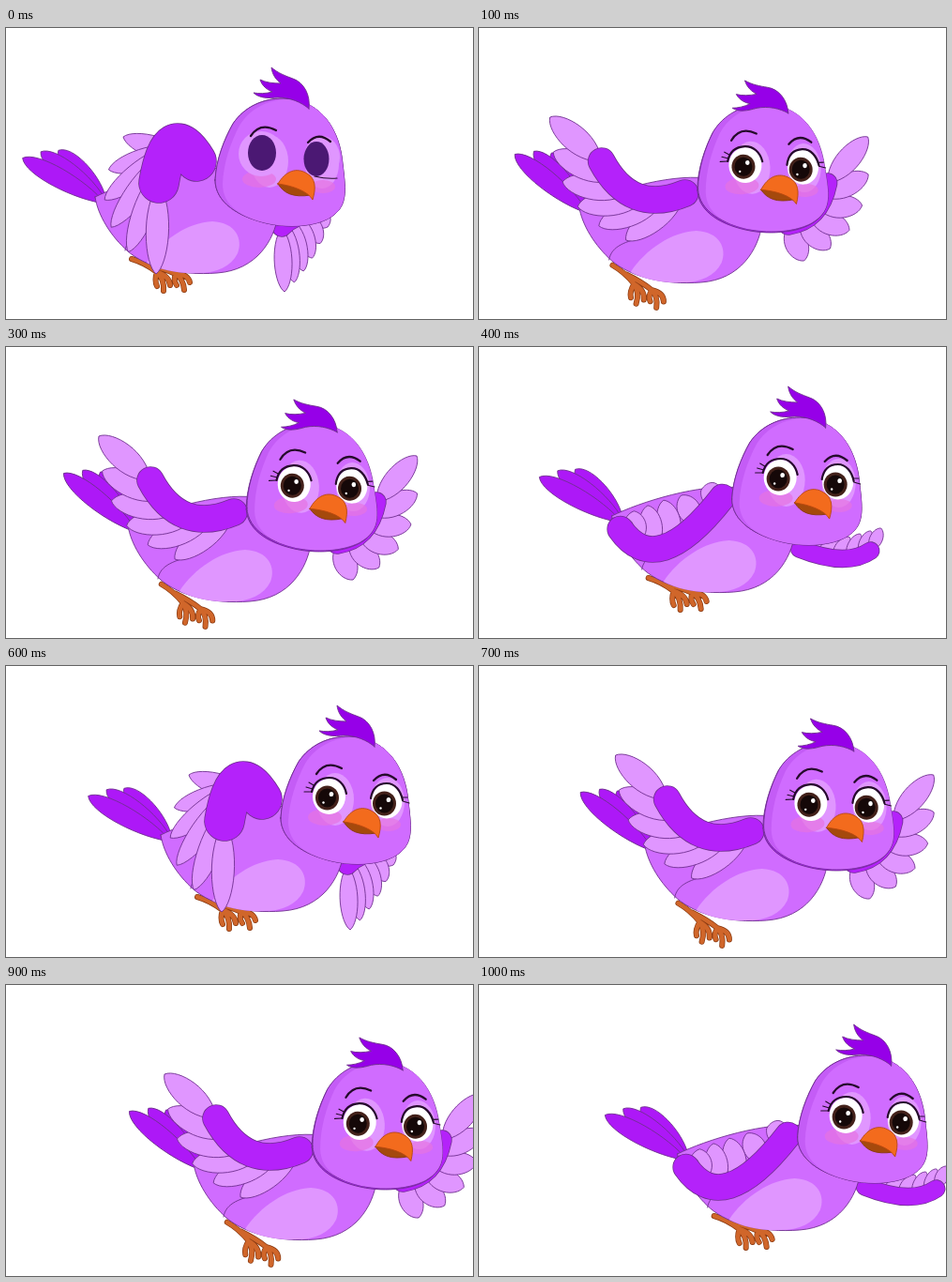
Write an HTML page with a canvas that moves like this. It is 498 by 310 pixels and loops after 1.05 s.

```html
<!DOCTYPE html>
<html lang="en">
<head>
<meta charset="utf-8">
<title>Flying bird</title>
<style>
  html, body { margin: 0; width: 100%; height: 100%; overflow: hidden; background: #fff; }
  canvas { display: block; width: 498px; height: 310px; }
</style>
</head>
<body>
<canvas id="stage" width="498" height="310"></canvas>
<script>
const ctx = document.getElementById('stage').getContext('2d');
const LOOP = 1050, STEP = 50, FLAP = 600, SPEED = 70 / FLAP, PLUMES = 6;
const C = {
  body: '#d06cff', shade: '#c45cf6', light: '#e096ff', wing: '#b422fa',
  tail: '#ad18f7', crest: '#9600e8', neck: '#a822ee', line: '#702f90',
  beak: '#f36b1d', mouth: '#a5490c', foot: '#d0662a', footLine: '#8a3a12', ink: '#260b2c'
};

// arm and tips: start, control and end of a curve, from outermost to innermost feather
const wing = (arm, tips, band, plume) => ({ arm, tips, band: [band], plume: [plume] });

const down = {
  near: wing([163,165, 175,95, 203,142], [160,262, 72,207, 125,116], 42, 32),
  far: wing([294,212, 305,200, 330,195], [297,281, 324,258, 343,212], 20, 25)
};
const up = {
  near: wing([136,84, 150,140, 205,168], [67,24, 80,150, 146,204], 40, 40),
  far: wing([376,122, 374,150, 335,185], [453,92, 410,214, 327,240], 28, 34)
};
const mid = {
  near: wing([119,142, 150,200, 208,176], [64,95, 65,195, 145,226], 28, 36),
  far: wing([360,165, 352,205, 318,210], [403,116, 413,224, 335,248], 20, 32)
};
const swept = {
  near: wing([104,194, 143,250, 213,160], [106,181, 135,165, 190,153], 27, 32),
  far: wing([371,217, 345,235, 295,215], [382,193, 355,200, 325,210], 18, 18)
};
const timeline = [[0, down], [100, mid], [200, up], [300, mid], [400, swept], [FLAP, down]];

const shape = {
  body: 'M95 180C125 165 190 145 230 150L290 200C286 225 268 258 225 261C185 264 150 255 130 238C112 222 98 200 95 180Z',
  belly: 'M150 250C166 226 194 207 220 206C245 207 253 225 247 240C240 254 225 261 205 261C185 262 165 258 150 250Z',
  thigh: 'M164 213C146 217 129 222 127 237',
  head: 'M223 162C224 140 233 118 242 102C254 84 274 75 296 75C338 77 356 110 359 145C362 170 364 186 352 197C338 211 305 214 278 208C248 201 223 186 223 162Z',
  face: 'M231 166C232 143 240 121 249 104C260 86 278 77 299 76C338 77 356 110 359 145C362 170 364 186 352 197C338 211 305 214 278 208C252 202 231 190 231 166Z',
  crest: 'M323 86C325 72 318 58 306 54C298 51 290 48 283 42C284 50 288 55 293 59C285 59 277 58 271 55C273 62 279 66 284 68C277 70 270 70 264 69C270 75 280 75 290 74C303 74 315 79 323 86Z',
  beak: 'M290 166C298 152 310 148 321 155C330 160 331 170 327 183C322 174 306 168 290 166Z',
  mouth: 'M290 166C296 176 306 181 325 178C318 171 305 167 290 166Z',
  brows: 'M261 115Q271 100 288 109M322 122Q333 110 346 121',
  lids: 'M256 134C259 122 267 119 275 119C284 119 291 126 293 136M319 141C321 129 328 125 336 125C345 125 351 133 353 143',
  lashes: 'M257 131L250 129M256 134L248 134M258 127L253 124M352 140L358 140M353 144L360 146',
  legs: 'M134 246Q148 250 161 260Q158 269 161 275M161 260Q169 268 168 280M161 260Q174 264 175 274M150 252Q168 256 181 262Q178 269 182 274M181 262Q189 267 190 279M181 262Q194 262 196 271',
  squint: 'M329 158Q342 161 353 160'
};
for (const k in shape) shape[k] = new Path2D(shape[k]);

const mix = (a, b, k) => a.map((v, i) => v + (b[i] - v) * k);

function wingAt(side, phase) {
  const i = timeline.findIndex(([end]) => end > phase);
  const [t0, a] = timeline[i - 1], [t1, b] = timeline[i];
  const pose = {};
  for (const key in a[side]) pose[key] = mix(a[side][key], b[side][key], (phase - t0) / (t1 - t0));
  return pose;
}

function onCurve([ax, ay, bx, by, cx, cy], u) {
  const v = 1 - u;
  return [v * v * ax + 2 * u * v * bx + u * u * cx, v * v * ay + 2 * u * v * by + u * u * cy];
}

function paint(path, fill, stroke = C.line, width = 0.9) {
  if (fill) { ctx.fillStyle = fill; ctx.fill(path); }
  if (stroke) { ctx.strokeStyle = stroke; ctx.lineWidth = width; ctx.stroke(path); }
}

function oval(x, y, rx, ry, fill) {
  const p = new Path2D();
  p.ellipse(x, y, rx, ry, 0, 0, Math.PI * 2);
  paint(p, fill, null);
}

function group(draw, x, y, turn = 0, px = 0, py = 0, size = 1) {
  ctx.save();
  ctx.translate(x + px, y + py);
  ctx.rotate(turn * Math.PI / 180);
  ctx.scale(size, size);
  ctx.translate(-px, -py);
  draw();
  ctx.restore();
}

// blunt: fullness near the tip
function feather([x, y], [tx, ty], w, fill, blunt) {
  const dx = tx - x, dy = ty - y, len = Math.hypot(dx, dy) || 1;
  const nx = -dy / len * w, ny = dx / len * w;
  const at = (d, n) => [x + dx * d + nx * n, y + dy * d + ny * n];
  const p = new Path2D();
  p.moveTo(x, y);
  p.bezierCurveTo(...at(0.3, 0.6), ...at(0.9, blunt), tx, ty);
  p.bezierCurveTo(...at(0.9, -blunt), ...at(0.3, -0.6), x, y);
  paint(p, fill);
}

function drawWing({ arm, tips, band, plume }) {
  for (let i = PLUMES - 1; i >= 0; i--) {
    const u = i / (PLUMES - 1);
    feather(onCurve(arm, u), onCurve(tips, u), plume[0], C.light, 0.4);
  }
  const p = new Path2D();
  p.moveTo(arm[0], arm[1]);
  p.quadraticCurveTo(...arm.slice(2));
  paint(p, null, C.line, band[0] + 1.6);
  paint(p, null, C.wing, band[0]);
}

function tail() {
  for (let i = 2; i >= 0; i--) {
    const a = (207 + 10 * i) * Math.PI / 180, r = 98 - 13 * i;
    feather([106, 187 - 4 * i], [105 + r * Math.cos(a), 183 + r * Math.sin(a)], 21, C.tail, 0.7);
  }
}

function legs() {
  paint(shape.legs, null, C.footLine, 6);
  paint(shape.legs, null, C.foot, 4.6);
}

function eye(x, y, rx, ry, px, py) {
  oval(x, y, rx, ry, '#fff');
  oval(px, py, 12.5, 13, '#43211a');
  oval(px, py, 9.5, 10, '#150808');
  oval(px + 4.5, py - 4, 2.3, 2.6, '#fff');
  oval(px - 4, py + 5, 1.2, 1.2, '#fff');
}

function openEyes() {
  eye(274.5, 139, 17.5, 19, 272.5, 140.5);
  eye(336, 144, 16.5, 18.5, 333.5, 146.5);
  paint(shape.lids, null, C.ink, 2.2);
  paint(shape.lashes, null, C.ink, 1.1);
}

function dimEyes() {
  oval(272, 134, 24, 24, C.light);
  oval(337, 138, 19, 23, C.light);
  oval(273, 133, 15, 19, '#4b1873');
  oval(331, 139.5, 13.5, 18.5, '#4b1873');
  paint(shape.squint, null, C.ink, 1.2);
}

function head(lift, dim) {
  group(() => paint(shape.head, C.neck), -1.5 * lift, 2.6 * lift);
  paint(shape.head, C.shade);
  paint(shape.face, C.body, null);
  group(() => paint(shape.crest, C.crest), 0, 0, -16 * lift, 323, 86, 1 - 0.05 * lift);
  oval(281, 142, 20, 28, C.light);
  oval(337, 145, 18, 26, C.light);
  oval(270, 161, 18, 9, 'rgba(230,115,225,.7)');
  oval(338, 169, 13, 7, 'rgba(230,115,225,.7)');
  (dim ? dimEyes : openEyes)();
  group(() => paint(shape.brows, null, C.ink, 2.3), 0, -6 * lift);
  paint(shape.mouth, C.mouth, C.footLine);
  paint(shape.beak, C.beak, '#b8480f');
}

function bird(t) {
  const phase = t % FLAP;
  const lift = Math.max(0, 1 - Math.abs(phase - 200) / 200);

  drawWing(wingAt('far', phase));
  group(tail, 0, 20 * lift, 20 * lift, 102, 182);
  group(legs, -6 * lift, 14 * lift, 27 * lift, 135, 245);
  group(() => {
    paint(shape.body, C.body);
    paint(shape.belly, C.light, null);
    paint(shape.thigh, null);
  }, 0, 20 * lift);
  drawWing(wingAt('near', phase));
  group(() => head(lift, t < STEP), -4 * lift, 12.5 * lift, -5.5 * lift, 292, 145);
}

const start = performance.now();
function frame(now) {
  const t = Math.floor(Math.max(0, now - start) % LOOP / STEP) * STEP;
  ctx.fillStyle = '#fff';
  ctx.fillRect(0, 0, 498, 310);
  ctx.lineCap = ctx.lineJoin = 'round';
  group(() => bird(t), t * SPEED, 0);
  requestAnimationFrame(frame);
}
frame(start);
</script>
</body>
</html>
```
